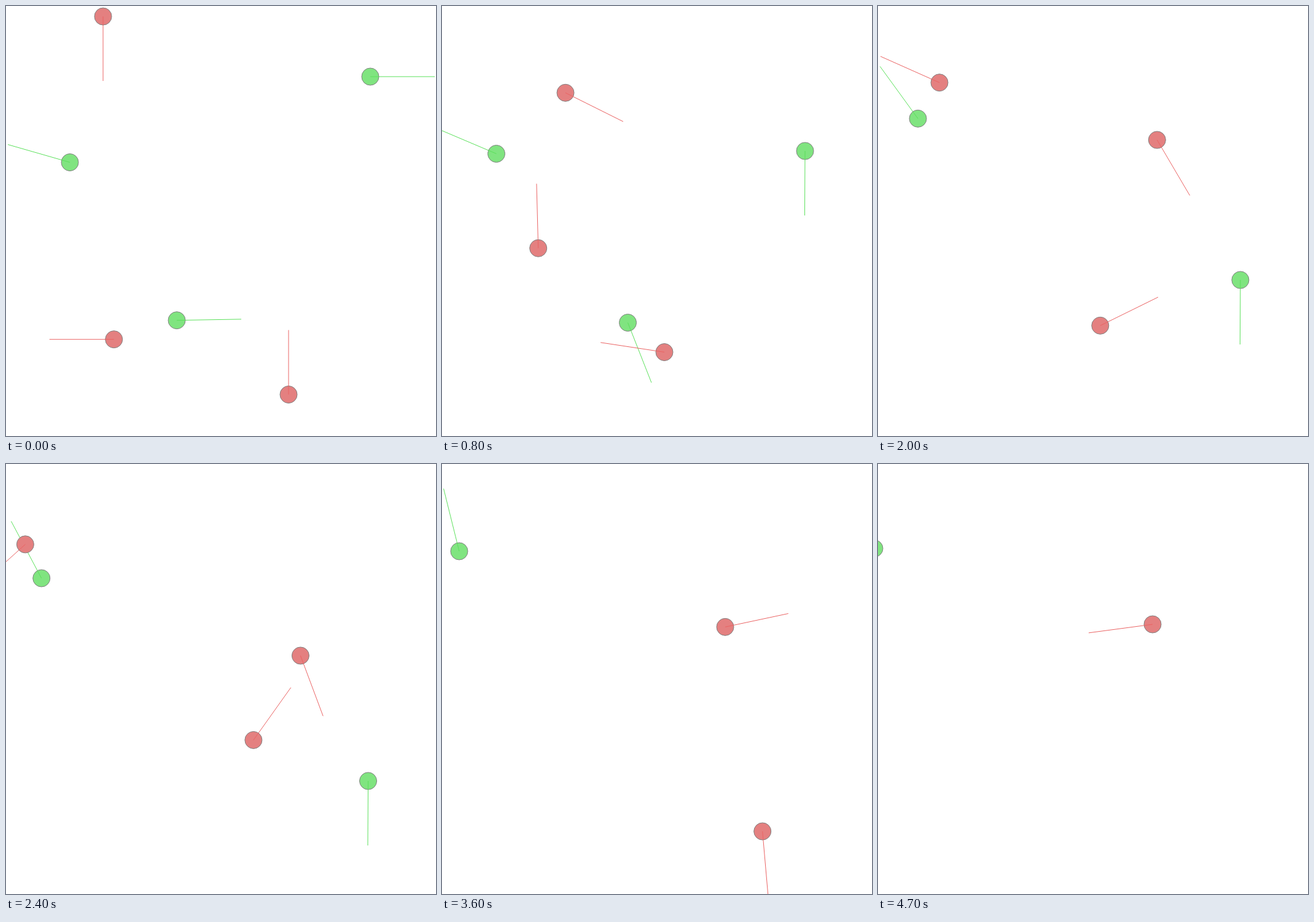
Recreate the animation shown at these times as an HTML page with a canvas. Size 700 px wide and 700 px high, loop 4800 ms.

```html
<!DOCTYPE html>
<html>
<head>
<meta charset="utf-8">
<style>
html, body { margin: 0; width: 100%; height: 100%; overflow: hidden; background: #fff; }
canvas { display: block; }
</style>
</head>
<body>
<canvas id="stage" width="700" height="700"></canvas>
<script>
const ctx = document.getElementById('stage').getContext('2d');
const LOOP = 4800, STEP = 100, RADIUS = 14, REACH = 105;
const HUNTER = { fill: '#e48080', line: '#ea6464', speed: 24 };
const PREY = { fill: '#80e480', line: '#5ce05c', speed: 17.5 };

// All agents share these waypoint times, in steps; step 0 is a turn on the spot.
const BEATS = [1, 8, 12, 20, 29, 36, 47];

// Waypoints are [x, y, heading in degrees]; after the last one an agent runs straight on.
const agents = [
  { kind: PREY, path: [[593, 115, 0], [591, 236, 90.3]] },
  { kind: PREY, path: [[104, 254.5, 196], [88.5, 240.5, 203], [73, 226.5, 252],
    [65, 183.3, 234], [49.5, 190, 252], [28, 142, 256], [-6, 137.5, 180]] },
  { kind: PREY, caught: 15, path: [[278, 511.7, -1], [302.5, 515.5, 68.5], [327, 522.3, 8.8]] },
  { kind: HUNTER, path: [[158, 17, 90], [201, 141.3, 26.5], [291, 159, 6.4],
    [454.3, 218, 59.5], [485.5, 438.3, 82], [521.7, 598, 85]] },
  { kind: HUNTER, path: [[175.7, 542.7, 180], [156.7, 394.3, 268.5], [155.3, 288, 269.7],
    [100, 124.7, 204], [-9, 182.7, 55.4], [-80, 230, 180]] },
  { kind: HUNTER, path: [[460, 632.5, 270], [362, 563.5, 188.6], [294.5, 537.5, 201.3],
    [361.8, 520.3, 333.8], [402, 327, 270], [461, 265.3, 348], [447, 261, 172.4]] }
];

const rad = deg => deg * Math.PI / 180;
const ahead = ([x, y, heading], d) =>
  [x + d * Math.cos(rad(heading)), y + d * Math.sin(rad(heading)), heading];

function hermite(p, q, m, n, u) {
  const v = 1 - u;
  return p * v * v * (1 + 2 * u) + q * u * u * (3 - 2 * u) + m * u * v * v - n * u * u * v;
}

function pose({ kind, path }, t) {
  if (t < BEATS[0]) return path[0];
  const last = path.length - 1;
  if (t >= BEATS[last]) return ahead(path[last], kind.speed * (t - BEATS[last]));

  const i = BEATS.findIndex(beat => beat > t);
  const [x0, y0, h0] = path[i - 1], [x1, y1, h1] = path[i];
  const dx = x1 - x0, dy = y1 - y0, chord = Math.hypot(dx, dy);
  // Everyone sets off facing the first waypoint.
  const start = i === 1 ? Math.atan2(dy, dx) * 180 / Math.PI : h0;
  const turn = ((h1 - start + 540) % 360 + 360) % 360 - 180;
  const u = (t - BEATS[i - 1]) / (BEATS[i] - BEATS[i - 1]);
  const along = (p, q, f) => hermite(p, q, chord * f(rad(start)), chord * f(rad(h1)), u);
  return [along(x0, x1, Math.cos), along(y0, y1, Math.sin), start + turn * u];
}

function drawAgent(agent, t) {
  if (t >= agent.caught) return;
  const at = pose(agent, t), [x, y] = at, [tipX, tipY] = ahead(at, REACH);
  ctx.beginPath();
  ctx.arc(x, y, RADIUS, 0, 2 * Math.PI);
  ctx.fillStyle = agent.kind.fill;
  ctx.fill();
  ctx.strokeStyle = '#808080';
  ctx.stroke();
  ctx.beginPath();
  ctx.moveTo(x, y);
  ctx.lineTo(tipX, tipY);
  ctx.strokeStyle = agent.kind.line;
  ctx.stroke();
}

function frame() {
  const t = Math.floor(performance.now() % LOOP / STEP);
  ctx.clearRect(0, 0, 700, 700);
  agents.forEach(agent => drawAgent(agent, t));
  requestAnimationFrame(frame);
}
frame();
</script>
</body>
</html>
```
